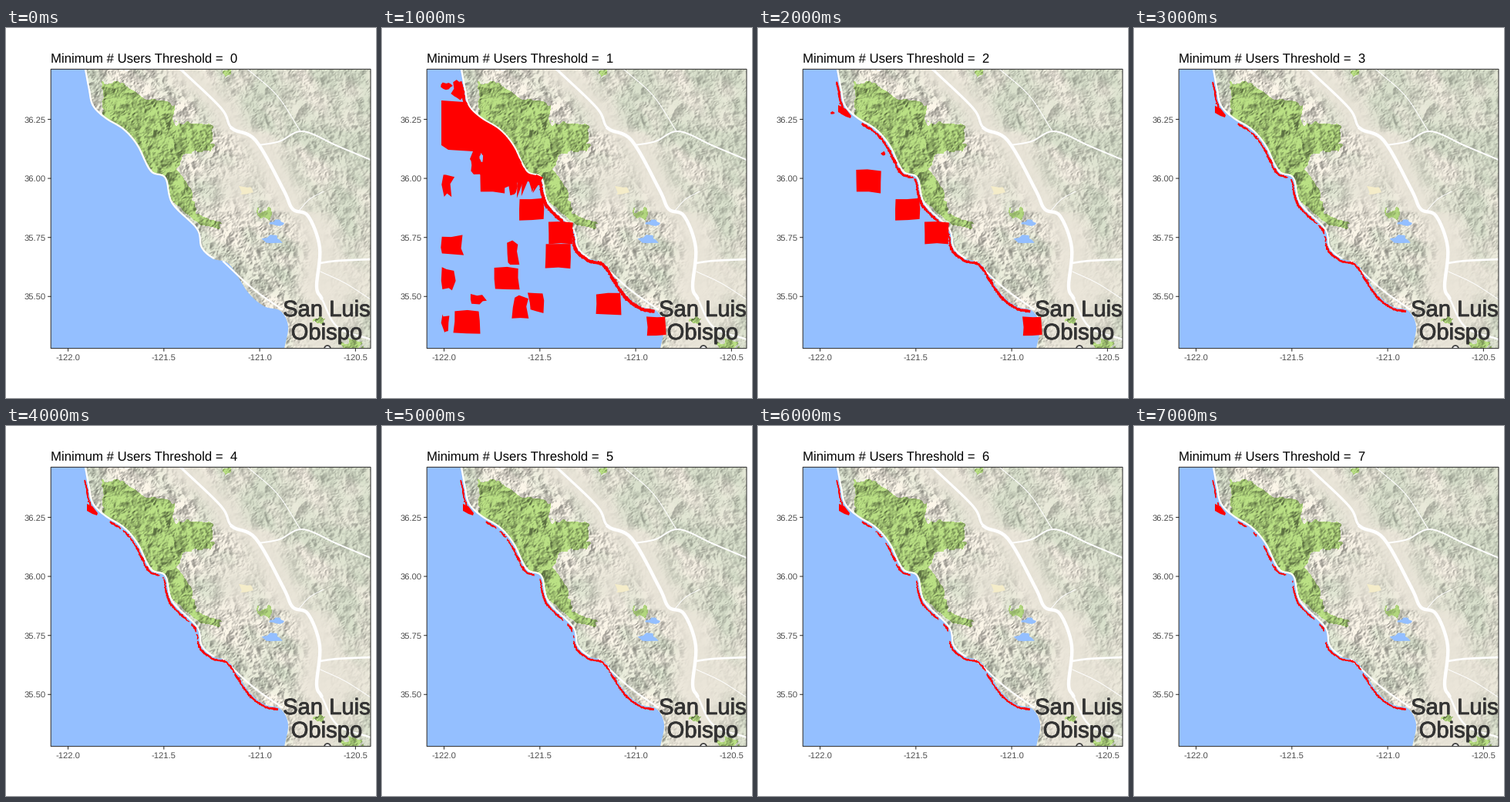
Write a matplotlib script that moves like this. It is 480 by 480 pixels and loops after 8 s.

```python
import numpy as np
import matplotlib.pyplot as plt
from matplotlib.animation import FuncAnimation
from matplotlib.collections import LineCollection
from matplotlib.patches import Circle, Polygon, Rectangle
from matplotlib.path import Path
from matplotlib.patheffects import withStroke

plt.rcParams["font.family"] = "Liberation Sans"
plt.rcParams["text.hinting"] = "none"

LEFT, RIGHT, TOP, BOTTOM = 58.2, 473, 53.4, 415.6
W, H = 415, 362
SEA, RED, INK = "#94bfff", "#ff0000", "#333333"


def pts(text):
    """Turn 'x,y x,y' into an array of points."""
    return np.array([p.split(",") for p in text.split()], float)


def curve(keys, n=8):
    """Catmull-Rom curve through key points."""
    p = np.vstack([2 * keys[0] - keys[1], keys, 2 * keys[-1] - keys[-2]])
    t = np.linspace(0, 1, n, endpoint=False)[:, None]
    parts = []
    for a, b, c, d in zip(p, p[1:], p[2:], p[3:]):
        parts.append(b + .5 * t * (c - a + t * (2 * a - 5 * b + 4 * c - d
                                               + t * (3 * (b - c) + d - a))))
    return np.vstack(parts + [keys[-1:]])


def blob(x, y, rx, ry, seed, n=11):
    """Ragged patch around a centre."""
    rng = np.random.default_rng(seed)
    a = np.arange(n) * 2 * np.pi / n
    r = rng.uniform(.6, 1.2, n)
    return np.c_[x + rx * r * np.cos(a), y + ry * r * np.sin(a)]


def cell(x, y, w, h, seed, rough=1.2):
    """Grid cell with slightly worn corners."""
    corners = np.array([(-1, -1), (0, -1), (1, -1), (1, 0), (1, 1), (0, 1), (-1, 1), (-1, 0)])
    wear = np.random.default_rng(seed).uniform(-rough, rough, corners.shape)
    return (x, y) + corners * (w / 2, h / 2) + wear


COAST = curve(pts("102,53 107,80 112,101 128,117 152,132 170,153 187,186 206,195 "
                  "215,228 247,261 253,285 268,299 290,307 314,343 335,361 356,367 "
                  "366,387 361,416"))
HIGHWAY = curve(pts("226,53 279,104 293,130 324,146 360,210 372,235 392,244 "
                    "407,285 403,335 409,350"))
FOREST = pts("127,72 152,72 180,92 217,98 218,125 268,126 266,160 234,163 222,184 "
             "242,212 246,240 280,252 278,260 250,253 212,222 190,186 152,130 124,116")
GREENS = [blob(288, 58, 7, 7, 1), blob(337, 240, 10, 9, 2),
          blob(408, 379, 11, 6, 3), blob(448, 411, 14, 8, 4)]
ROADS = [("328,152 355,147 385,134 430,153 473,171", 2),
         ("407,305 430,302 473,300", 2.6),
         ("313,53 352,88 382,134", 1.1),
         ("380,237 394,222 412,212", 1),
         ("408,316 440,331 473,352", 1),
         ("409,350 430,388 473,404", 2.4),
         ("282,303 320,338 358,365", 2.2)]


def noise(rng, sigma, stretch=1.0):
    """Smooth field, drawn out along the NW-SE diagonal."""
    fy, fx = np.fft.fftfreq(H)[:, None], np.fft.fftfreq(W)[None, :]
    u, v = (fx + fy) / 2 ** .5, (fx - fy) / 2 ** .5
    blur = np.exp(-2 * np.pi ** 2 * sigma ** 2 * ((u * stretch) ** 2 + v ** 2))
    field = np.fft.ifft2(np.fft.fft2(rng.standard_normal((H, W))) * blur).real
    return field / field.std()


def terrain():
    rng = np.random.default_rng(12)
    x, y = np.meshgrid(LEFT + .5 + np.arange(W), TOP + .5 + np.arange(H))
    height = sum(-s * np.abs(noise(rng, s, k)) for s, k in ((4.5, 2), (2.2, 1.6), (1.2, 1)))
    gy, gx = np.gradient(height)
    shade = .8 * gx + .55 * gy
    shade = np.clip(shade / shade.std(), -2.4, 1) - .4

    # Flat valley along the highway, softer hills east of it
    gap = x - np.interp(y, HIGHWAY[:, 1], HIGHWAY[:, 0])
    east = gap > 0
    rough = np.clip((np.abs(gap) * .75 - 5) / 26, .08, 1)
    for cx, cy, r in ((300, 205, 34), (442, 330, 40), (405, 385, 26)):
        rough *= 1 - .85 * np.exp(-((x - cx) ** 2 + (y - cy) ** 2) / r ** 2)

    tint = np.clip(.4 + .2 * east + .35 * noise(rng, 7, 1.6), 0, 1) * rough
    tint = tint[..., None]
    rgb = (1 - tint) * np.array([234, 229, 217]) + tint * np.array([207, 214, 195])
    depth = np.where(east, .085, .13) * rough

    edge = 1.5 * noise(rng, 2)
    spots = np.c_[(x + edge).ravel(), (y + edge).ravel()]
    for i, shape in enumerate([FOREST] + GREENS):
        inside = Path(shape).contains_points(spots).reshape(H, W)
        rgb[inside] = (170, 205, 121)
        depth[inside] = .08 if i == 2 else .16
    rgb = rgb * (1 + depth * shade)[..., None]
    return np.clip(rgb, 0, 255).astype(np.uint8)


def shore_strip(level):
    """Ragged ribbon just off the coast that thins out as the level rises."""
    rng = np.random.default_rng(40)
    step = np.r_[0, np.cumsum(np.hypot(*np.diff(COAST, axis=0).T))]
    s = np.arange(18, step[-1] - 56, 1.2)
    line = np.c_[np.interp(s, step, COAST[:, 0]), np.interp(s, step, COAST[:, 1])]
    along = np.gradient(line, axis=0)
    along /= np.hypot(*along.T)[:, None]
    line += 2.6 * along[:, ::-1] * (-1, 1) + rng.normal(0, .35, line.shape)

    wobble = np.convolve(rng.random(len(s) + 6), np.ones(7) / 7, "valid")
    extra = {1: 1.6, 2: .6}.get(level, -.12 * (level - 3))
    y = line[:, 1]
    width = .2 + 4.4 * wobble + extra + .5 * (y > 292) - .8 * ((y > 262) & (y < 290))
    keep = (width > 1.5) & ((y < 102) | (y > 124))
    segs = np.stack([line[:-1], line[1:]], axis=1)[keep[:-1]]
    return LineCollection(segs, linewidths=.8 * width[:-1][keep[:-1]], colors=RED,
                          capstyle="projecting", zorder=7)


PATCH = pts("105,101 112,104 119,113 118,116 112,114 105,110")
# Offshore cells: centre and size
PAIR = [(143, 199, 32, 29), (194, 235, 31, 28), (232, 266, 31, 28), (356, 387, 24, 24)]
LONE = [(228, 296, 33, 30), (162, 325, 31, 28), (294, 358, 31, 27), (110, 381, 33, 29)]
WORN = [(92, 283, 26, 24), (168, 292, 15, 28), (86, 326, 15, 28), (180, 363, 18, 28),
        (199, 356, 18, 24), (125, 352, 16, 8), (82, 384, 7, 22), (85, 204, 13, 25),
        (120, 179, 13, 18), (170, 206, 13, 18)]
SLIVERS = [(115, 254, 3, 14), (126, 250, 4, 6), (181, 290, 4, 26), (80, 347, 7, 6)]


def red_shapes(level):
    if level > 2:
        return [PATCH]
    cells = [cell(*c, seed=i) for i, c in enumerate(PAIR)]
    if level == 2:
        bits = [blob(162, 163, 3, 3, 5), blob(97, 110, 3, 2, 6)]
        return cells + bits + [PATCH + (-1, -1), PATCH + (2, 1)]
    cells += [cell(*c, seed=i) for i, c in enumerate(LONE, 10)]
    cells += [cell(*c, seed=i, rough=3) for i, c in enumerate(WORN, 20)]
    cells += [np.array([(x + w / 2, y - h / 2), (x - w / 2, y + h / 2), (x, y)])
              for x, y, w, h in SLIVERS]
    shore = COAST[(COAST[:, 1] > 94) & (COAST[:, 1] < 196)]
    mass = np.vstack([shore, pts("206,205 184,197 158,208 127,190 114,170 118,160 "
                                 "86,158 77,152 77,94")])
    rng = np.random.default_rng(8)
    teeth = [np.array([(x, 190), (x + 9, 194), (x + rng.uniform(-6, 9), rng.uniform(208, 221))])
             for x in range(176, 202, 6)]
    scraps = [blob(98, 81, 8, 13, 7), blob(84, 75, 7, 5, 9)]
    return cells + [mass] + teeth + scraps


fig = plt.figure(figsize=(480 / 72, 480 / 72), dpi=72, facecolor="white")
ax = fig.add_axes([0, 0, 1, 1])
ax.axis("off")
box = dict(xy=(LEFT, TOP), width=RIGHT - LEFT, height=BOTTOM - TOP, snap=False)
panel = ax.add_patch(Rectangle(**box, fc=SEA, ec="none"))
land = ax.add_patch(Polygon(np.vstack([COAST, [(473, 416), (473, 53)]]), fc="none", ec="none"))
relief = ax.imshow(terrain(), extent=(LEFT, RIGHT, BOTTOM, TOP),
                   aspect="auto", interpolation="nearest", zorder=1)
ax.set(xlim=(0, 480), ylim=(480, 0))
relief.set_clip_path(land)


def inside_panel(artist):
    artist.set_clip_path(panel)
    return artist


def road(path, width):
    inside_panel(ax.plot(*path.T, color="white", lw=width, solid_joinstyle="round", zorder=2)[0])


def area(shape, color, zorder=2):
    return inside_panel(ax.add_patch(Polygon(shape, fc=color, ec="none", zorder=zorder)))


area(cell(312, 211, 15, 9, 3, 3), "#f4ecc9")
area(blob(345, 275, 14, 6, 12), SEA)
area(blob(351, 253, 9, 4, 13), SEA)
road(COAST[COAST[:, 1] < 300] + (.8, -.6), 2.2)
for keys, width in ROADS:
    road(curve(pts(keys)), width)
road(HIGHWAY, 3.2)
road(HIGHWAY[HIGHWAY[:, 1] > 129], 4.4)

for y, word in ((374, "San Luis"), (404, "Obispo")):
    label = ax.text(416, y, word, size=29.2, color=INK, ha="center", zorder=3,
                    path_effects=[withStroke(linewidth=.8, foreground=INK)])
    inside_panel(label)
inside_panel(ax.add_patch(Circle((417, 416), 4, fc="white", ec="#444444", lw=1.8, zorder=3)))

ax.add_patch(Rectangle(**box, fc="none", ec=INK, lw=1.07, zorder=9))
tick = dict(color=INK, lw=1.07, snap=False)
for i in range(4):
    x, y = 80.5 + 124.3 * i, 118.5 + 76.6 * i
    ax.plot([x, x], [BOTTOM, BOTTOM + 3.5], **tick)
    ax.plot([LEFT - 3.5, LEFT], [y, y], **tick)
    ax.text(x, 431, f"{-122 + .5 * i:.1f}", size=11.2, color="#4d4d4d", ha="center")
    ax.text(52, y + 4, f"{36.25 - .25 * i:.2f}", size=11.2, color="#4d4d4d", ha="right")
title = ax.text(58, 45, "", size=16.8, color="black")

marks = []


def draw(level):
    while marks:
        marks.pop().remove()
    title.set_text(f"Minimum # Users Threshold =  {level}")
    if level == 0:
        return
    marks.extend(area(shape, RED, 5) for shape in red_shapes(level))
    if level == 1:
        marks.append(area(blob(129, 168, 3, 6, 3), SEA, 6))
    strip = ax.add_collection(shore_strip(level), autolim=False)
    marks.append(inside_panel(strip))


anim = FuncAnimation(fig, draw, frames=8, interval=1000, repeat=True,
                     repeat_delay=0, init_func=lambda: draw(0))
plt.show()
```
